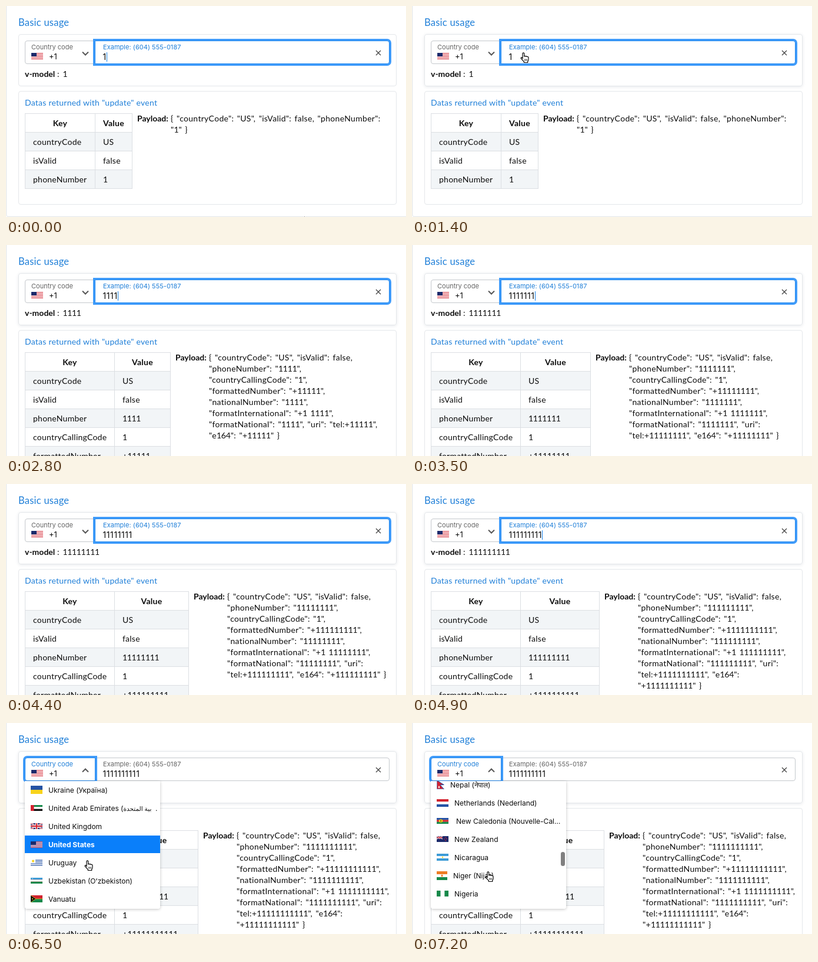
Write an HTML page that moves like this. It is 680 px wide and 360 px high and loops after 7.3 s.

```html
<!DOCTYPE html>
<html lang="en">
<head>
<meta charset="utf-8">
<title>Phone number input</title>
<style>
html, body { margin: 0; width: 100%; height: 100%; overflow: hidden; background: #fff; }
#stage { position: relative; width: 680px; height: 360px; overflow: hidden; background: #fff; color: #0c0c0c;
  font: 14px/20px Lato, "Open Sans", sans-serif; letter-spacing: .24px; white-space: pre; }
#stage div, #stage svg.at, .at { position: absolute; box-sizing: border-box; }
.num { font-style: normal; letter-spacing: -.34px; }
.ui { font-family: Inter, Roboto, sans-serif; letter-spacing: 0; }
.title { color: #1f7fd8; }
#page { left: 0; top: -20px; width: 700px; height: 380px; border: 1px solid #e2e4e6; border-radius: 4px; }
.card { left: 21px; width: 643px; border: 1px solid #e4e7ea; border-radius: 4px; }
#top { top: 48px; height: 89px; }
#top.hover { box-shadow: 0 1px 5px rgba(60, 80, 110, .13); }
#bottom { top: 145px; height: 194px; }
.field { top: 59px; height: 40px; border: 1px solid #c4c8cc; background: #fff; }
#country { left: 32px; width: 120px; border-radius: 4px 0 0 4px; }
#phone { left: 151px; width: 501px; border-radius: 0 4px 4px 0; }
.field.focus { z-index: 1; border-color: #2188ee; box-shadow: 0 0 0 3px #3f9bfa; }
.label { top: 0; font-size: 11px; line-height: 20px; color: #646464; }
.focus .label { color: #1f7fd8; }
#value { left: 12.5px; top: 17px; font-size: 14px; }
#digits { letter-spacing: .6px; }
#caret { display: inline-block; width: 1px; height: 16px; background: #1680ea; vertical-align: -3px; }
#grid { left: 32px; top: 183px; display: grid; grid-auto-rows: 32px; border: solid #dcdfe3; border-width: 1px 0 0 1px; }
#grid > * { box-sizing: border-box; line-height: 31px; border: solid #dcdfe3; border-width: 0 1px 1px 0; }
#grid span { padding-left: 13px; }
#grid b { text-align: center; }
#grid .odd { background: #f2f5f7; }
#payload { top: 182px; line-height: 19px; letter-spacing: .31px; word-spacing: 1.5px; }
#payload b { position: absolute; left: 0; letter-spacing: 0; }
#payload span { position: absolute; left: 57px; }
#payload .num { letter-spacing: -.2px; }
#menu, #shade { left: 32px; top: 99px; width: 230px; height: 218px; border-radius: 0 0 4px 4px; }
#menu { z-index: 2; overflow: hidden; background: #fff; font-size: 12px; }
#shade { z-index: 1; box-shadow: 0 1px 5px rgba(0, 0, 0, .24); }
#list { left: 0; top: 0; width: 230px; }
.row { left: 0; width: 230px; height: 30px; line-height: 31px; overflow: hidden; }
.row svg { position: absolute; left: 10px; }
.row span { position: absolute; }
.row small { font-size: 10.5px; }
.row.on { background: #0a7ffa; color: #fff; font-weight: 700; }
#thumb { left: 221px; width: 7px; height: 24px; border-radius: 4px; background: #808080; }
#hand, #arrow { z-index: 3; }
</style>
</head>
<body>
<div id="stage">
  <div id="page"></div>
  <div class="title" style="left:21px;top:18px;font-size:16.5px">Basic usage</div>
  <div id="top" class="card"></div>
  <div id="bottom" class="card"></div>
  <div id="country" class="field ui">
    <div class="label" style="left:10px">Country code</div>
    <div id="us" style="left:10px;top:20px;width:20px;height:12px;line-height:0"></div>
    <div style="left:40px;top:16px;font-size:13px">+1</div>
    <svg class="at" style="left:95px;top:14px" width="14" height="14"><path id="chevron" d="M2 4.5l5 5 5-5" fill="none" stroke="#555" stroke-width="2"/></svg>
  </div>
  <div id="phone" class="field ui">
    <div class="label" style="left:13px;letter-spacing:.04px">Example: (604) 555-0187</div>
    <div id="value"><span id="digits"></span><span id="caret"></span></div>
    <svg class="at" style="left:476px;top:15px" width="10" height="10"><path d="M1 1l8 8M9 1l-8 8" stroke="#444" stroke-width="1.3"/></svg>
  </div>
  <b class="at" style="left:32px;top:106px;letter-spacing:0">v-model</b>
  <div style="left:87px;top:106px">:</div>
  <div id="model" class="num" style="left:96.5px;top:106px"></div>
  <div class="title" style="left:32px;top:155px">Datas returned with "update" event</div>
  <div id="grid"></div>
  <div id="payload"><b>Payload:</b><span id="json"></span></div>
  <div id="shade"></div>
  <div id="menu" class="ui"><div id="list"></div><div id="thumb"></div></div>
  <svg id="arrow" class="at" width="13" height="19"><path d="M1 1v14l3.3-3 2.2 5 2-1-2.1-4.8h4.4z" fill="#000" stroke="#fff"/></svg>
  <svg id="hand" class="at" width="17" height="19"><path d="M4 10.5V2.2a1.4 1.4 0 0 1 2.8 0v4.6q1.2-1 2.4.2 1.3-.8 2.4.5 2.4-.5 2.4 1.8v3.2q-.2 2-1.3 3.2v1.8H6.4v-1.6Q4 13.8 1.3 10.4q-.6-1.9 1.3-1.5z" fill="#fff" stroke="#000" stroke-width="1.2"/><path d="M7.6 11.5v3M9.5 11.5v3M11.4 11.5v3" stroke="#000" stroke-width=".8"/></svg>
</div>
<script>
const $ = id => document.getElementById(id);
const LOOP = 7300, STEP = 100, ROW = 31;
const KEYS = [-200, 1900, 2200, 2600, 3000, 3200, 3400, 3900, 4500, 5100];
const OPEN = 5800, SCROLL = 6500, SCROLL_TIME = 700;
const PATH = [
  [0, 507, 358], [600, 483, 304], [1300, 189, 80], [5300, 189, 80], [5700, 112, 80],
  [5900, 112, 80], [6300, 138, 235], [6500, 138, 235], [7200, 129, 254]
];
const INK = { r: '#d3222f', w: '#fff', b: '#2452a4', g: '#16894a', y: '#f8d31c', k: '#111', o: '#ee7d25', l: '#3c9bd6', n: '#1b2a6b' };

const rect = (x, y, w, h, c) => `<rect x="${x}" y="${y}" width="${w}" height="${h}" fill="${INK[c]}"/>`;
const dot = (x, y, r, c) => `<circle cx="${x}" cy="${y}" r="${r}" fill="${INK[c]}"/>`;
const line = (d, c, w) => `<path d="${d}" stroke="${INK[c]}" stroke-width="${w}" fill="none"/>`;
const area = (d, c) => `<path d="${d}" fill="${INK[c]}"/>`;
const JACK = line('M0 0L20 12M20 0L0 12', 'w', 2.6) + line('M0 0L20 12M20 0L0 12', 'r', .9) +
  line('M10 0V12M0 6H20', 'w', 4) + line('M10 0V12M0 6H20', 'r', 2.2);

// name: [emblem, flag height, flag width, label slot]
const SPECIAL = {
  'Ukraine': ['', 14],
  'United Arab Emirates': [rect(0, 0, 5.5, 12, 'r'), 10],
  'United Kingdom': [JACK, 10],
  'United States': [rect(0, 0, 9, 6.5, 'n'), 11],
  'Uruguay': [rect(0, 0, 8, 6.7, 'w') + dot(4, 3.3, 2, 'y'), 13],
  'Uzbekistan': [line('M0 4H20M0 8H20', 'r', .3) + dot(3, 2, .7, 'w'), 10],
  'Vanuatu': [area('M0 0L9 6 0 12z', 'k') + line('M0 0L9 6H20M0 12L9 6', 'y', .7) + dot(3, 6, 1, 'y'), 12],
  'Nepal': [area('M1 0L19 6H9L18 11.5H1z', 'r') + line('M1 0V12H19L9 6H19z', 'b', .9) + dot(6, 9, 1.6, 'w'), 15, 13, 13],
  'Netherlands': ['', 13],
  'New Caledonia': [dot(7, 6, 3.2, 'y') + line('M7 4V8', 'k', 1), 10, 20, 23],
  'New Zealand': [`<g transform="scale(.5)">${JACK}</g>` + dot(15, 3, .9, 'r') + dot(13, 6, .9, 'r') + dot(17, 5.5, .9, 'r') + dot(15, 9, .9, 'r'), 10],
  'Nicaragua': [dot(10, 6, 1.2, 'y'), 12],
  'Niger': [dot(10, 6, 1.6, 'o'), 15, 18, 18]
};
const COUNTRIES = ('Nepal (नेपाल):,Netherlands (Nederland):hrwb,New Caledonia (Nouvelle-Cal…:hbrg,New Zealand:hn,Nicaragua:hlwl,' +
  'Niger (Nijar):howg,Nigeria:vgwg,Niue:hy,Norfolk Island:vgwg,North Korea:hbrb,Northern Mariana Islands:hb,Norway (Norge):hrbr,' +
  'Oman:hwrg,Pakistan:vwggg,Palau:hl,Palestine:hkwg,Panama (Panamá):vwr,Papua New Guinea:hrk,Paraguay:hrwb,Peru (Perú):vrwr,' +
  'Philippines:hbr,Poland (Polska):hwr,Portugal:vgrr,Puerto Rico:hrwrwr,Qatar:vwrr,Réunion:vbwr,Romania (România):vbyr,' +
  'Russia (Россия):hwbr,Rwanda:hllyg,Saint Barthélemy:vbwr,Saint Helena:hn,Saint Kitts and Nevis:hgkr,Saint Lucia:hl,' +
  'Saint Martin:vbwr,Saint Pierre and Miquelon:hl,Saint Vincent:vbyg,Samoa:hrr,San Marino:hwl,São Tomé and Príncipe:hgyg,' +
  'Saudi Arabia:hg,Senegal:vgyr,Serbia:hrbw,Seychelles:vbyrg,Sierra Leone:hgwl,Singapore:hrw,Sint Maarten:hrb,Slovakia:hwbr,' +
  'Slovenia:hwbr,Solomon Islands:hbyg,Somalia:hl,South Africa:hrgb,South Korea:hw,South Sudan:hkrg,Spain (España):hryyr,' +
  'Sri Lanka:vgor,Sudan:hrwk,Suriname:hgwrwg,Svalbard and Jan Mayen:hrbr,Swaziland:hbyryb,Sweden (Sverige):hbyb,' +
  'Switzerland (Schweiz):hr,Syria:hrwk,Taiwan:hr,Tajikistan:hrwg,Tanzania:hgkl,Thailand:hrwbbwr,Timor-Leste:hr,Togo:hgygyg,' +
  'Tokelau:hn,Tonga:hr,Trinidad and Tobago:hr,Tunisia:hr,Turkey (Türkiye):hr,Turkmenistan:hg,Turks and Caicos Islands:hn,' +
  'Tuvalu:hl,U.S. Virgin Islands:hw,Uganda:hkyrkyr,Ukraine (Україна):hby,' +
  'United Arab Emirates (<small>بية المتحدة</small>  .:hgwk,United Kingdom:hn,' +
  'United States:hrwrwrwrwrwrwr,Uruguay:hwbwbwbwbw,Uzbekistan (Oʻzbekiston):hlwg,Vanuatu:hrg').split(',').map(s => s.split(':'));
const FIRST = COUNTRIES.findIndex(c => c[0].startsWith('Ukraine'));

function flag(code, [emblem = '', h = 10, w = 20] = [], style = '') {
  const bands = [...code.slice(1)], n = bands.length;
  const body = bands.map((c, i) => code[0] === 'h' ? rect(0, i * 12 / n, 20, 12 / n, c) : rect(i * 20 / n, 0, 20 / n, 12, c)).join('');
  return `<svg width="${w}" height="${h}" viewBox="0 0 20 12" preserveAspectRatio="none" style="${style}">${body}${emblem}</svg>`;
}

function countryRow([name, code], i) {
  const key = name.split(' (')[0], spec = SPECIAL[key] || [];
  const [, h = 10, , slot = 20] = spec;
  return `<div class="row${key === 'United States' ? ' on' : ''}" style="top:${i * ROW}px">` +
    flag(code, spec, `top:${Math.floor((ROW - h) / 2)}px`) + `<span style="left:${20 + slot}px">${name}</span></div>`;
}

const digitRuns = s => s.replace(/\d+/g, '<i class="num">$&</i>');

function tableHtml(n, num) {
  const rows = [['countryCode', 'US'], ['isValid', 'false'], ['phoneNumber', num]];
  if (n > 1) rows.push(['countryCallingCode', '1'], ['formattedNumber', '+1' + num]);
  return '<b>Key</b><b>Value</b>' + rows.map((r, i) =>
    r.map(s => `<span class="${i % 2 ? '' : 'odd'}">${digitRuns(s)}</span>`).join('')).join('');
}

function payloadText(n, num) {
  const head = '{ "countryCode": "US", "isValid": false,';
  if (n < 2) return `${head} "phoneNumber":\n"${num}" }`;
  const afterUri = n < 5 ? ' ' : '\n', afterTel = n < 5 ? '\n' : ' ', afterE164 = n > 8 ? '\n' : ' ';
  return [head, `"phoneNumber": "${num}",`, '"countryCallingCode": "1",', `"formattedNumber": "+1${num}",`,
    `"nationalNumber": "${num}",`, `"formatInternational": "+1 ${num}",`,
    `"formatNational": "${num}", "uri":${afterUri}"tel:+1${num}",${afterTel}"e164":${afterE164}"+1${num}" }`].join('\n');
}

function showNumber(n) {
  const num = '1'.repeat(n), full = n > 1;
  const keyCol = full ? 152 : 119, valueCol = full ? Math.round(63.2 + 7.9 * n) : 63;
  $('digits').textContent = $('model').textContent = num;
  $('grid').style.gridTemplateColumns = `${keyCol}px ${valueCol}px`;
  $('grid').innerHTML = tableHtml(n, num);
  $('payload').style.left = 41 + keyCol + valueCol + 'px';
  $('json').innerHTML = digitRuns(payloadText(n, num));
  $('page').style.height = full ? '500px' : '380px';
  $('bottom').style.height = full ? '400px' : '194px';
}

function pointer(t) {
  const i = Math.max(1, PATH.findIndex(p => p[0] >= t));
  const [t0, x0, y0] = PATH[i - 1], [t1, x1, y1] = PATH[i];
  const p = (t - t0) / (t1 - t0), e = p * p * (3 - 2 * p);
  return [x0 + (x1 - x0) * e, y0 + (y1 - y0) * e];
}

const show = (id, on) => { $(id).style.display = on ? '' : 'none'; };
const place = (id, x, y) => { $(id).style.left = x + 'px'; $(id).style.top = y + 'px'; };
let shown = 0;

function draw(t) {
  const n = KEYS.filter(k => k <= t).length;
  if (n !== shown) showNumber(shown = n);

  const open = t >= OPEN;
  $('country').classList.toggle('focus', open);
  $('phone').classList.toggle('focus', !open);
  $('chevron').setAttribute('transform', open ? 'rotate(180 7 7)' : '');
  $('caret').style.visibility = !open && (t - KEYS[n - 1]) % 1000 < 500 ? '' : 'hidden';
  show('menu', open);
  show('shade', open);

  const p = Math.min(1, Math.max(0, (t - SCROLL) / SCROLL_TIME));
  const end = 9.5, start = FIRST * ROW, y = start + (end - start) * (1 - (1 - p) ** 2);
  $('list').style.top = -y + 'px';
  $('thumb').style.top = 121 + (y - end) * .0256 + 'px';
  show('thumb', p > 0);

  const [mx, my] = pointer(t), visible = t < KEYS[1] || t >= 5300;
  const onField = t >= 5300 || (my < 102 && mx > 150);
  show('hand', visible && onField);
  show('arrow', visible && !onField);
  place('hand', mx - 5, my - 1);
  place('arrow', mx - 1, my - 1);
  $('top').classList.toggle('hover', t > 1300 || my < 137);
}

$('us').innerHTML = flag('hrwrwrwrwrwrwr', SPECIAL['United States']);
$('list').innerHTML = COUNTRIES.map(countryRow).join('');

const begin = performance.now();
function tick() {
  const t = (performance.now() - begin) % LOOP;
  draw(Math.floor(t / STEP) * STEP);
  requestAnimationFrame(tick);
}
tick();
</script>
</body>
</html>
```
